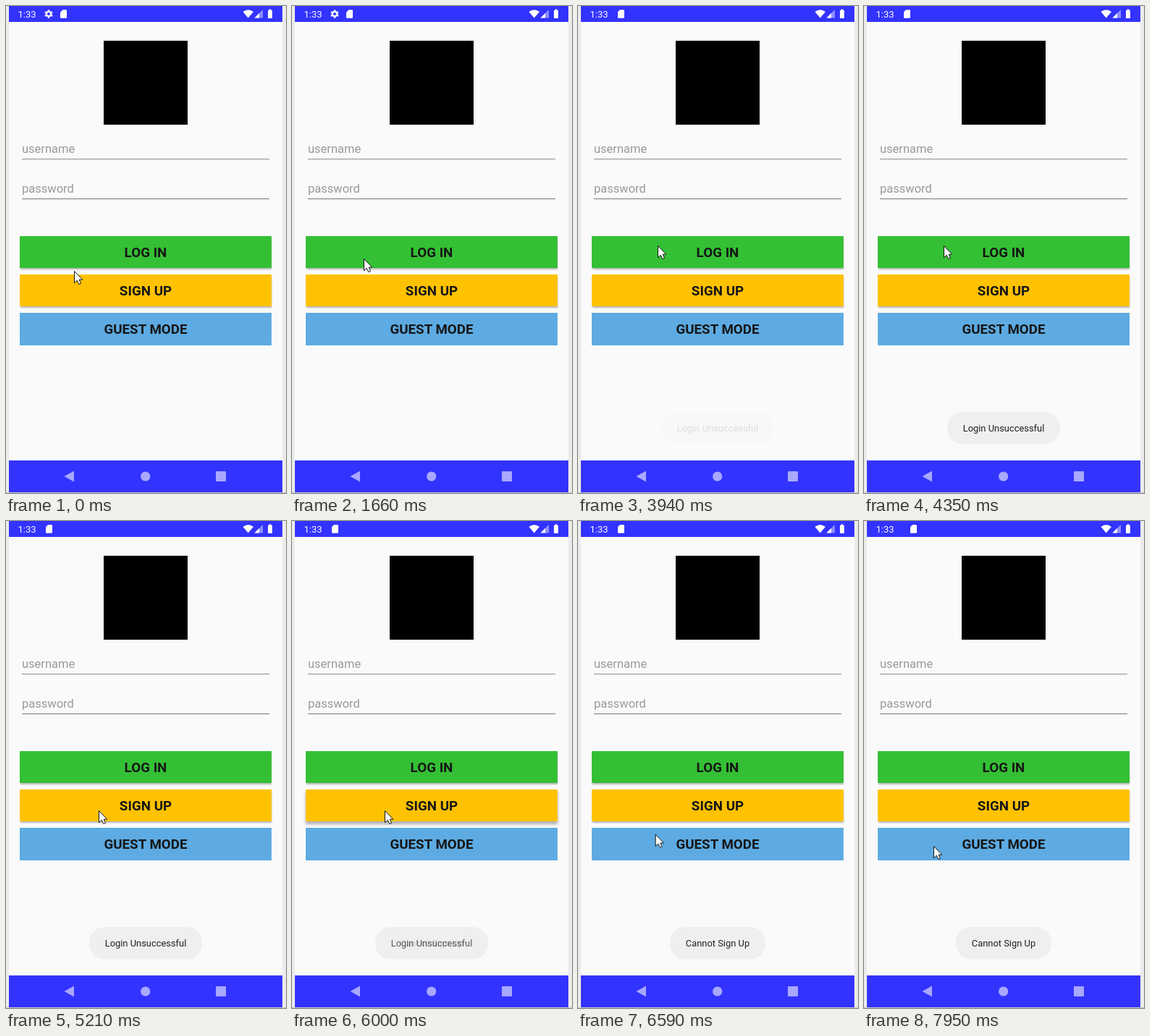
Animation of 387x673 px, one loop 8000 ms. Source, as an HTML page:

```html
<!DOCTYPE html>
<html lang="en">
<head>
<meta charset="utf-8">
<title>Login screen</title>
<style>
  html, body { margin: 0; width: 100%; height: 100%; overflow: hidden; background: #ebebeb; }
  #stage { position: absolute; left: 0; top: 0; width: 387px; height: 673px; overflow: hidden; font-family: Roboto, sans-serif; }
  svg { position: absolute; left: 0; top: 0; }

  .button {
    position: absolute; left: 19px; width: 348px; height: 44px;
    font: bold 18.8px/47px Roboto, sans-serif; text-align: center; color: #161616;
  }
  .login  { top: 318px; background: #34c034; }
  .signup { top: 371px; background: #ffc200; }
  .guest  { top: 424px; height: 45px; background: #5dabe2; }
  .raised { box-shadow: 0 2px 2px -.5px rgba(0, 0, 0, .28); }

  .hint { font-size: 16.5px; fill: #999; }
  .clock { font-size: 13px; fill: #fff; }
  .toast text { font-size: 12.9px; fill: #202020; text-anchor: middle; }
  .toast rect { fill: #efefef; }

  /* Every part shares one 8 s timeline: 1% = 80 ms. */
  .login, .signup, .gear, .card, .cursor, .fade { animation: 8s linear infinite; }
  .login { animation-name: press-login; }
  .signup { animation-name: press-signup; }
  .gear { animation-name: gear; }
  .card { animation-name: card; }
  .cursor { animation-name: cursor; }
  .first-bg { animation-name: first-bg; }
  .first-text { animation-name: first-text; }
  .second { animation-name: second; }

  @keyframes press-login {
    0%, 46.125% { box-shadow: 0 2px 2px -.5px rgba(0, 0, 0, .28); animation-timing-function: step-end; }
    43.875% { box-shadow: 0 3px 4px rgba(0, 0, 0, .3); animation-timing-function: step-end; }
    45% { box-shadow: 0 4px 4px rgba(0, 0, 0, .3); animation-timing-function: step-end; }
  }
  @keyframes press-signup {
    0%, 76.5% { box-shadow: 0 2px 2px -.5px rgba(0, 0, 0, .28); animation-timing-function: step-end; }
    74.25% { box-shadow: 0 3px 4px rgba(0, 0, 0, .3); animation-timing-function: step-end; }
    75% { box-shadow: 0 4px 4px rgba(0, 0, 0, .3); animation-timing-function: step-end; }
  }
  @keyframes gear {
    0% { opacity: 1; animation-timing-function: step-end; }
    36.125%, 100% { opacity: 0; }
  }
  @keyframes card {
    0% { transform: translate(75px, 5px); animation-timing-function: step-end; }
    36.125% { transform: translate(54.5px, 5px); animation-timing-function: step-end; }
    98.625% { transform: translate(57px, 5px); animation-timing-function: step-end; }
    99.375%, 100% { transform: translate(63.5px, 5px); }
  }
  @keyframes cursor {
    0% { transform: translate(94px, 366px); }
    15.646% { transform: translate(94px, 366px); animation-timing-function: steps(7); }
    20.75%, 22.438% { transform: translate(99px, 349px); animation-timing-function: steps(3); }
    24.5%, 60.625% { transform: translate(110px, 331px); animation-timing-function: steps(6); }
    65.125%, 78.7% { transform: translate(128px, 400px); animation-timing-function: steps(6); }
    83.125%, 100% { transform: translate(96px, 449px); }
  }
  @keyframes first-bg {
    0%, 48.52% { opacity: 0; animation-timing-function: steps(8); }
    54.375% { opacity: 1; }
    74.25% { opacity: 1; animation-timing-function: ease-in; }
    79.425%, 100% { opacity: 0; }
  }
  @keyframes first-text {
    0%, 48.52% { opacity: 0; animation-timing-function: steps(8); }
    54.375% { opacity: 1; }
    74.25% { opacity: 1; animation-timing-function: steps(6); }
    78.69%, 100% { opacity: 0; }
  }
  @keyframes second {
    0%, 74.25% { opacity: 0; animation-timing-function: steps(7); }
    79.425%, 100% { opacity: 1; }
  }
</style>
</head>
<body>
<div id="stage">
  <svg width="387" height="673">
    <rect x="4" width="378" height="672" fill="#fafafa"/>
    <rect x="4" width="378" height="22" fill="#33f"/>
    <rect x="4" y="628" width="378" height="44" fill="#33f"/>
    <rect y="672" width="387" height="1" fill="#c8c8c8"/>

    <text class="clock" x="16.5" y="16">1:33</text>
    <g class="gear" fill="none" stroke="#fff">
      <circle cx="59" cy="11" r="3.2" stroke-width="2.4"/>
      <circle cx="59" cy="11" r="4.9" stroke-width="1.8" pathLength="12" stroke-dasharray="1 1" stroke-dashoffset="-.5"/>
    </g>
    <path class="card" fill="#fff" d="M3.5 .3H8Q9 .3 9 1.3V10.8Q9 11.8 8 11.8H1Q0 11.8 0 10.8V3.8Z"/>
    <g fill="#fff">
      <path d="M327.5 8Q334.7 2.6 342 8L334.7 16.5Z"/>
      <path d="M355 5V16.5H343.5Z" opacity=".45"/>
      <path d="M350 10V16.5H343.5Z"/>
      <path d="M363.5 5V4.5H366.5V6H368V17H362V6H363.5Z"/>
    </g>

    <rect x="135" y="48" width="116" height="116"/>

    <text class="hint" x="22" y="203">username</text>
    <rect x="22" y="211" width="342" height="1" fill="#8c8c8c"/>
    <text class="hint" x="22" y="258">password</text>
    <rect x="22" y="266" width="342" height="1" fill="#777"/>

    <g fill="#a8a8ff">
      <path d="M80.5 650L94 642.5V657.5Z"/>
      <circle cx="192.7" cy="650" r="6.6"/>
      <rect x="290" y="643" width="14" height="14" rx="1"/>
    </g>
  </svg>

  <div class="button login raised">LOG IN</div>
  <div class="button signup raised">SIGN UP</div>
  <div class="button guest">GUEST MODE</div>

  <svg width="387" height="673">
    <g class="toast">
      <rect class="fade first-bg" x="115" y="561" width="156" height="44.5" rx="21"/>
      <text class="fade first-text" x="193" y="588">Login Unsuccessful</text>
      <g class="fade second">
        <rect x="127" y="561" width="132" height="44.5" rx="21"/>
        <text x="193" y="588">Cannot Sign Up</text>
      </g>
    </g>
    <path class="cursor" fill="#fff" stroke="#111" stroke-linejoin="round"
      d="M.5 .5V16.8L4.2 13.3L6.8 18.6L9.5 17.4L7.2 12.2H11.8Z"/>
  </svg>
</div>
</body>
</html>
```
